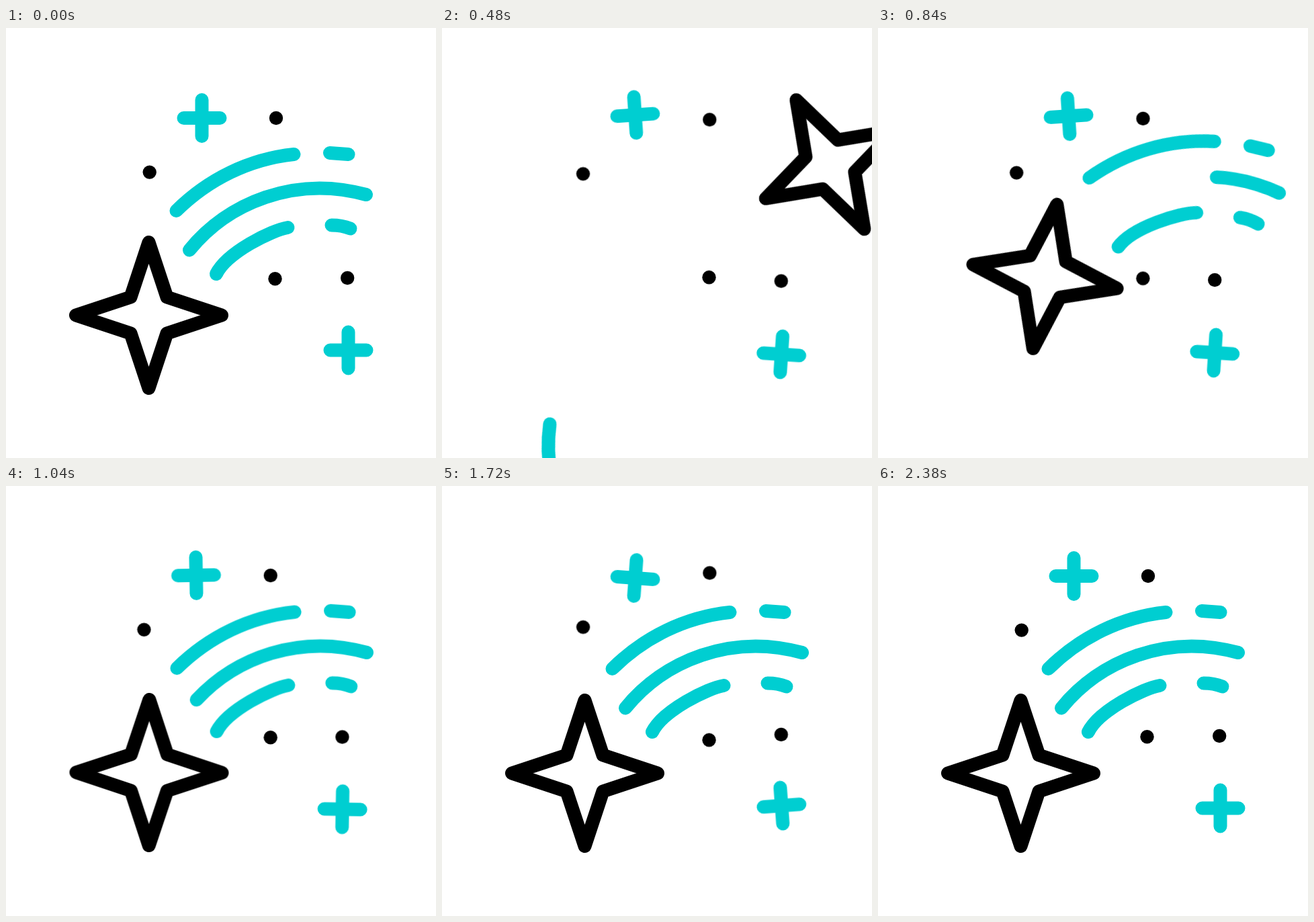
Recreate the animation shown at these times as an HTML page without scripts. Size 640 px wide and 640 px high, loop 2400 ms.

```html
<!DOCTYPE html>
<html lang="en">
<head>
<meta charset="utf-8">
<title>Shooting star</title>
<style>
html, body { margin: 0; width: 100%; height: 100%; overflow: hidden; background: #fff; }
svg { display: block; width: 100%; height: 100%; }

.line { fill: none; stroke: #00ced1; stroke-width: 20; stroke-linecap: round; stroke-linejoin: round; }
.dark { stroke: #000; }

svg * { animation: 2.4s cubic-bezier(.333, 0, .667, 1) infinite; }

/* Star and trails circle one pivot; the trails leave the stage later. */
.star, .trails { transform-origin: 581px 618px; }
.star { animation-name: star-orbit; }
.trails { animation-name: trail-orbit; }
@keyframes star-orbit {
  0% { transform: rotate(0deg); }
  14.58% { transform: rotate(-48deg); }
  14.59% { transform: rotate(93deg); animation-timing-function: cubic-bezier(.333, .667, .667, 1); }
  44.58%, 100% { transform: rotate(0deg); }
}
@keyframes trail-orbit {
  0% { transform: rotate(0deg); }
  16.67%, 23.32% { transform: rotate(-50deg); }
  23.33% { transform: rotate(46.7deg); animation-timing-function: cubic-bezier(.333, .667, .667, 1); }
  44.58%, 100% { transform: rotate(0deg); }
}

/* Each trail slips out at its front end and grows back from its tail. */
.trails path { stroke-dasharray: 100 400; }
.upper { animation-name: slip-upper; }
.middle { animation-name: slip-middle; }
.side { animation-name: slip-side; }
@keyframes slip-upper {
  0% { stroke-dashoffset: 0; }
  11.25%, 23.32% { stroke-dashoffset: -103; }
  23.33% { stroke-dashoffset: 103; }
  34.6%, 100% { stroke-dashoffset: 0; }
}
@keyframes slip-middle {
  0% { stroke-dashoffset: 0; }
  6.67% { stroke-dashoffset: 0; animation-timing-function: cubic-bezier(.333, 0, .667, .333); }
  22.6%, 27.89% { stroke-dashoffset: -103; }
  27.9% { stroke-dashoffset: 103; }
  45.8%, 100% { stroke-dashoffset: 0; }
}
@keyframes slip-side {
  0%, 6.67% { stroke-dashoffset: 0; }
  19%, 23.32% { stroke-dashoffset: -103; }
  23.33% { stroke-dashoffset: 103; }
  34.6%, 100% { stroke-dashoffset: 0; }
}

/* Background sparkles drift in small loops. */
.drift { transform-box: fill-box; transform-origin: center; animation-name: sway, bob, tilt; }
@keyframes sway {
  0%, 95.8%, 100% { translate: 0 0; }
  43.3% { translate: var(--x) 0; }
}
@keyframes bob {
  0% { transform: translateY(0); animation-timing-function: ease-out; }
  18.75% { transform: translateY(var(--y1)); }
  70.8% { transform: translateY(var(--y2)); }
  99%, 100% { transform: translateY(0); }
}
@keyframes tilt {
  0%, 99%, 100% { rotate: 0deg; }
  27.5% { rotate: var(--tilt, 0deg); }
  64.6% { rotate: calc(-1 * var(--tilt, 0deg)); }
}
</style>
</head>
<body>
<svg viewBox="0 0 640 640">
  <path class="line drift" style="--x:-8.5px;--y1:-4.6px;--y2:3px;--tilt:-4.7deg" d="M264.5 134h54M291.5 107v54"/>
  <path class="line drift" style="--x:-8.8px;--y1:6.2px;--y2:-3.8px;--tilt:4.7deg" d="M482.5 479.5h54M509.5 452.5v54"/>
  <circle class="drift" style="--x:-8.3px;--y1:2.4px;--y2:-4.6px" cx="402" cy="134" r="10.2"/>
  <circle class="drift" style="--x:-8.3px;--y1:2.5px;--y2:-4.6px" cx="213.7" cy="214.6" r="10.2"/>
  <circle class="drift" style="--x:-6.8px;--y1:-2.2px;--y2:4.8px" cx="400.5" cy="373.2" r="10.2"/>
  <circle class="drift" style="--x:-7.7px;--y1:4.6px;--y2:-2.1px" cx="508.2" cy="372" r="10.2"/>

  <g class="trails line">
    <path class="upper" pathLength="100" d="M428.5 188C362 195 301 225 253.5 272"/>
    <path class="middle" pathLength="100" d="M536 248C430 219 330 260 273 330.5"/>
    <path class="side" pathLength="100" d="M419.5 297C395 301 329 334 313 366"/>
    <path class="side" pathLength="100" d="M509.5 188L482 186"/>
    <path class="side" pathLength="100" d="M512.5 298.5Q500 293.5 484.5 293.5"/>
  </g>
  <path class="star line dark" d="M212.5 319L239.5 400.5 321 427.5 239.5 454.5 212.5 536 185.5 454.5 104 427.5 185.5 400.5Z"/>
</svg>
</body>
</html>
```
